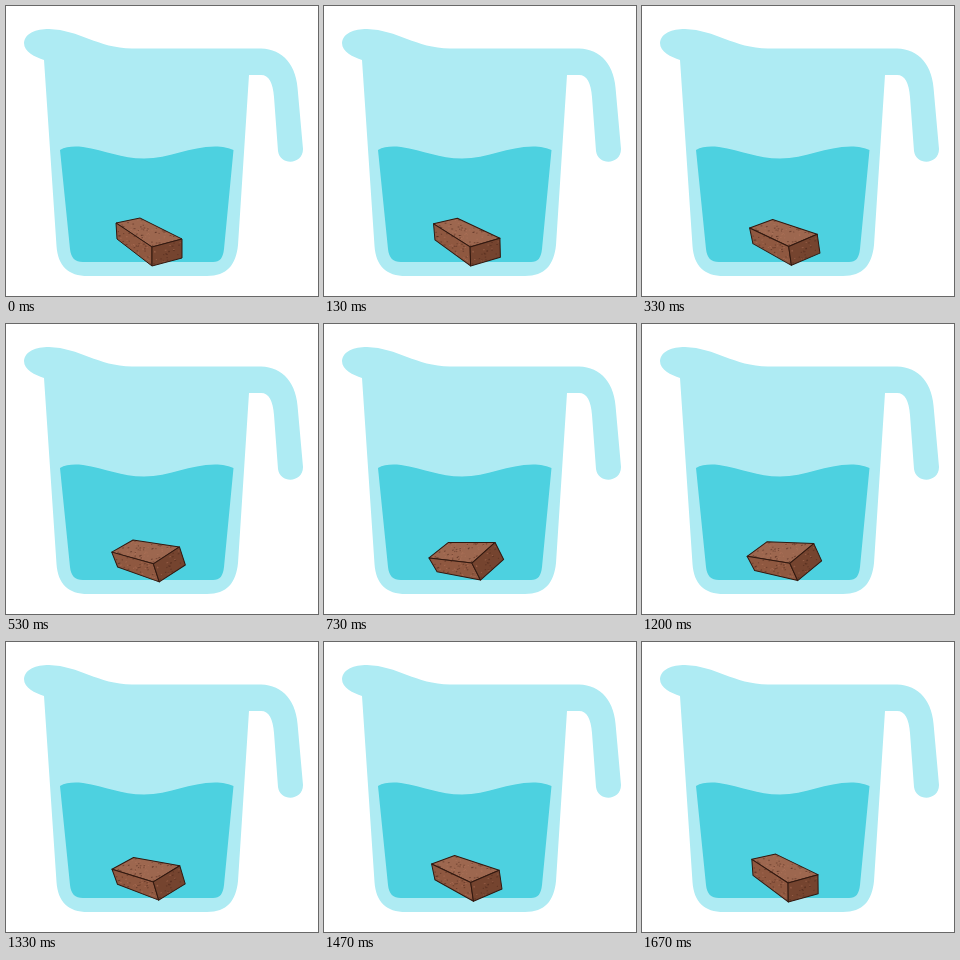
These frames come from a looping animation (312 by 290 pixels, 1.74 s). An HTML page with a canvas:

```html
<!DOCTYPE html>
<html lang="en">
<head>
<meta charset="utf-8">
<title>Brick in a jug of water</title>
<style>
html, body { margin: 0; width: 100%; height: 100%; overflow: hidden; background: #fff; }
canvas { display: block; }
</style>
</head>
<body>
<canvas id="stage" width="312" height="290"></canvas>
<script>
const ctx = document.getElementById('stage').getContext('2d');
const LOOP = 1740, STEPS = 26, PEAK = 14.5;
const SWING = -31 * Math.PI / 180;

const jug = new Path2D(`M18 37C19 27 30 23 43 23C74 24 91 42 126 42.5H255
  C277 43 291 59 292 87L297 143C297 159 274 160 272 145L268 91
  C267 77 263 69 255 69H243L232 239C230 259 221 270 201 270H82
  C62 270 52 260 50.5 240L38 54C29 51 18 46 18 37Z`);
const water = new Path2D(`M54 144C60 140.5 68 140 77 141C100 144.5 115 152.5 138 152.5
  C163 152.5 184 140.5 209 140.5C217 140.5 222 142 227.5 144L218 243
  C217 252 214 256 207 256H77C69 256 65 252 64 243Z`);

// Brick corners around its pivot; "low" ones lie on the underside.
const pivot = [143, 236];
const left = [-33, -19], back = [-9, -24], right = [33, -3], front = [3, 5];
const lowLeft = [-32, -3], lowFront = [3, 24], lowRight = [33, 16];
const faces = [
  { corners: [left, back, right, front], fill: '#9d674f', specks: 65 },
  { corners: [left, front, lowFront, lowLeft], fill: '#8f5840', specks: 38 },
  { corners: [front, right, lowRight, lowFront], fill: '#75442f', specks: 24 }
];

const mix = (a, b, k) => a + (b - a) * k;
const mixPoint = (p, q, k) => [mix(p[0], q[0], k), mix(p[1], q[1], k)];

function randomizer(seed) {
  return () => (seed = (seed * 16807) % 2147483647) / 2147483647;
}

function drawFace({ corners, fill, specks }, random) {
  const [a, b, c, d] = corners;
  ctx.beginPath();
  corners.forEach(p => ctx.lineTo(...p));
  ctx.closePath();
  ctx.fillStyle = fill;
  ctx.fill();
  for (let i = 0; i < specks; i++) {
    const u = mix(0.04, 0.96, random()), v = mix(0.04, 0.96, random());
    const [x, y] = mixPoint(mixPoint(a, b, u), mixPoint(d, c, u), v);
    ctx.fillStyle = random() < 0.55 ? '#4a251a80' : '#b9796070';
    ctx.fillRect(x - 0.6, y - 0.5, 1 + random(), 1);
  }
  ctx.strokeStyle = '#32180f';
  ctx.lineWidth = 1;
  ctx.stroke();
}

// Swings out until PEAK, then back, eased at both ends.
function brickAngle(step) {
  const part = step < PEAK ? step / PEAK : (STEPS - step) / (STEPS - PEAK);
  return SWING * (1 - Math.cos(Math.PI * part)) / 2;
}

function draw(now) {
  // The small lead absorbs timings rounded to 10 ms.
  const step = Math.floor((now % LOOP) / LOOP * STEPS + 0.12) % STEPS;
  ctx.clearRect(0, 0, 312, 290);
  ctx.fillStyle = '#aeebf3';
  ctx.fill(jug);
  ctx.fillStyle = '#4dd1e0';
  ctx.fill(water);

  const random = randomizer(77);
  ctx.save();
  ctx.translate(...pivot);
  ctx.rotate(brickAngle(step));
  ctx.lineJoin = 'round';
  faces.forEach(face => drawFace(face, random));
  ctx.restore();
}

const start = performance.now();
function tick() {
  draw(performance.now() - start);
  requestAnimationFrame(tick);
}
tick();
</script>
</body>
</html>
```
